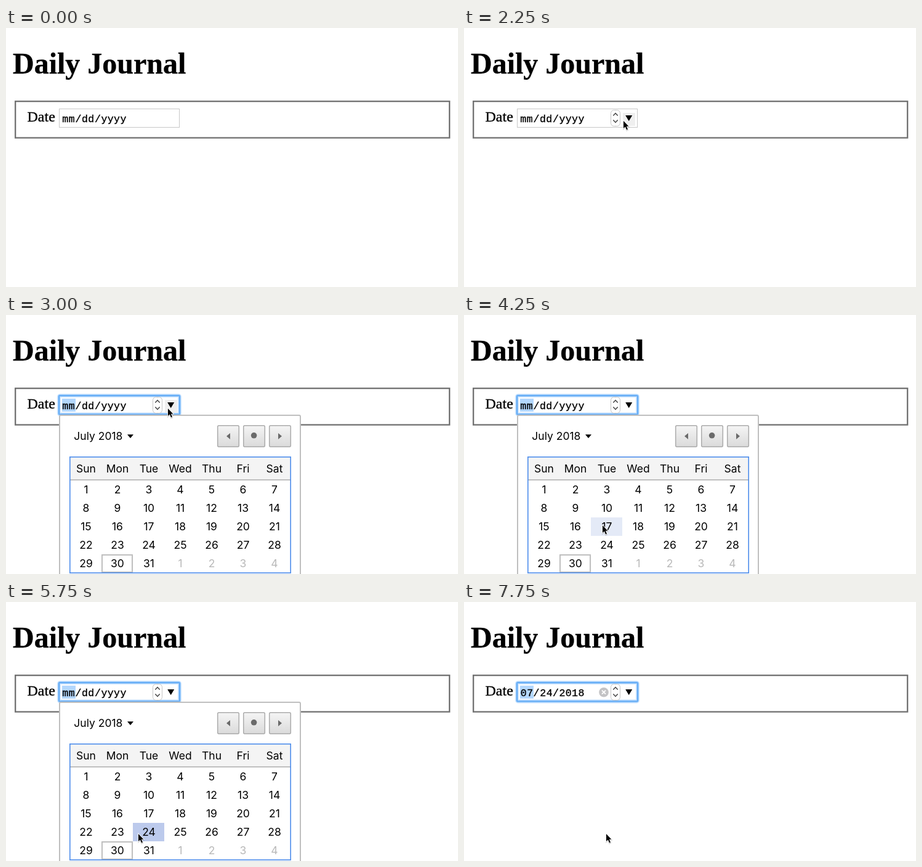
These frames come from a looping animation (734x421 px, 8000 ms). An HTML page:

```html
<!DOCTYPE html>
<html lang="en">
<head>
<meta charset="utf-8">
<title>Daily Journal</title>
<style>
html, body { margin: 0; width: 100%; height: 100%; overflow: hidden; background: #fff; }
svg { display: block; width: 734px; height: 421px; }
.serif { font-family: "Liberation Serif", "Times New Roman", serif; stroke: #000; stroke-width: .35px; }
.field { font: 16.6px "Liberation Mono", "Courier New", monospace; letter-spacing: .4px; stroke: #000; stroke-width: .35px; }
.cal text { font: 17.5px Inter, "Open Sans", sans-serif; }
.mid { text-anchor: middle; }

.step { animation: 8s step-end infinite; }
.hover { animation-name: hover; }
.button { animation-name: button; }
.focus { animation-name: focus; }
.open { animation-name: open; }
.empty { animation-name: empty; }
.filled { animation-name: filled; }
.d10 { animation-name: d10; }
.d17 { animation-name: d17; }
.d24 { animation-name: d24; }
.cursor { animation-name: cursor; }

@keyframes hover { 0% { opacity: 0 } 25%, 100% { opacity: 1 } }
@keyframes button { 0% { opacity: 0 } 25% { opacity: 1 } 46.875%, 100% { opacity: 0 } }
@keyframes focus { 0% { opacity: 0 } 34.375%, 100% { opacity: 1 } }
@keyframes open { 0% { opacity: 0 } 37.5% { opacity: 1 } 75%, 100% { opacity: 0 } }
@keyframes empty { 0% { opacity: 1 } 75%, 100% { opacity: 0 } }
@keyframes filled { 0% { opacity: 0 } 75%, 100% { opacity: 1 } }
@keyframes d10 { 0% { opacity: 0 } 50% { opacity: 1 } 53.125%, 100% { opacity: 0 } }
@keyframes d17 { 0% { opacity: 0 } 53.125% { opacity: 1 } 59.375%, 100% { opacity: 0 } }
@keyframes d24 {
  0% { opacity: 0; fill: #e4eaf7 }
  59.375% { opacity: 1; fill: #e4eaf7 }
  71.875%, 100% { opacity: 1; fill: #bccaec }
}
@keyframes cursor {
  0% { opacity: 0; transform: translate(490px, 31px) }
  9.375% { opacity: 1; transform: translate(490px, 31px) }
  12.5% { opacity: 1; transform: translate(306px, 107px) }
  15.625% { opacity: 1; transform: translate(235px, 133px) }
  25% { opacity: 1; transform: translate(251px, 146px) }
  28.125% { opacity: 1; transform: translate(257px, 150px) }
  31.25% { opacity: 1; transform: translate(261px, 151px) }
  43.75% { opacity: 1; transform: translate(260px, 154px) }
  46.875% { opacity: 1; transform: translate(256px, 251px) }
  50% { opacity: 1; transform: translate(226px, 337px) }
  53.125% { opacity: 1; transform: translate(223px, 341px) }
  56.25% { opacity: 1; transform: translate(212px, 358px) }
  59.375% { opacity: 1; transform: translate(207px, 371px) }
  62.5% { opacity: 1; transform: translate(205px, 376px) }
  65.625% { opacity: 1; transform: translate(213px, 376px) }
  93.75% { opacity: 1; transform: translate(212px, 375px) }
  96.875%, 100% { opacity: 1; transform: translate(229px, 376px) }
}
</style>
</head>
<body>
<svg viewBox="0 0 734 421" xmlns="http://www.w3.org/2000/svg">
  <defs>
    <linearGradient id="face" x2="0" y2="1">
      <stop offset="0" stop-color="#f5f5f5"/>
      <stop offset="1" stop-color="#dadada"/>
    </linearGradient>
  </defs>

  <text class="serif" x="11" y="74" font-size="48" font-weight="700">Daily Journal</text>
  <rect x="15.2" y="119.2" width="705" height="59.3" fill="none" stroke="#707070" stroke-width="2.3"/>
  <text class="serif" x="34.5" y="152" font-size="24">Date</text>

  <!-- date input -->
  <rect x="86.5" y="131.5" width="195" height="30" fill="#fff" stroke="#c8c8c8"/>
  <g class="step focus">
    <g fill="none" stroke="#5aa9f8">
      <rect x="86" y="131" width="196" height="30.5" rx="2" stroke-width="6.5" opacity=".22"/>
      <rect x="86" y="131" width="196" height="30.5" rx="2" stroke-width="4" opacity=".45"/>
      <rect x="86" y="131" width="196" height="30.5" rx="1" stroke-width="2" opacity=".75"/>
    </g>
    <rect x="91" y="136" width="22" height="21" fill="#b3d7fd"/>
  </g>
  <g class="field">
    <g class="step empty">
      <text x="91.3" y="152.5">mm</text><text x="123" y="152.5">dd</text><text x="154.4" y="152.5">yyyy</text>
    </g>
    <g class="step filled">
      <text x="91.8" y="152.5">07</text><text x="123.3" y="152.5">24</text><text x="154.4" y="152.5">2018</text>
    </g>
    <text x="112.6" y="152.5">/</text><text x="144" y="152.5">/</text>
  </g>
  <g class="step filled">
    <circle cx="227" cy="146.7" r="7.8" fill="#c3c3c5"/>
    <path d="M224 143.7l6 6m0-6l-6 6" stroke="#fff" stroke-width="1.8"/>
  </g>
  <rect class="step button" x="258" y="138" width="20" height="21" fill="#efefef"/>
  <g class="step hover">
    <rect x="238.5" y="133.5" width="15" height="26" rx="5" fill="#fff" stroke="#c4c4c4"/>
    <path d="M242.3 142.5l3.7-4 3.7 4M242.3 149.5l3.7 4 3.7-4" fill="none" stroke="#444" stroke-width="1.5"/>
    <path d="M262.2 142h11l-5.5 9.3z"/>
  </g>

  <!-- calendar popup -->
  <g class="cal step open">
    <rect x="87" y="163" width="391" height="290" rx="2" fill="#fff" stroke="#bfbfbf" stroke-width="2"/>
    <text x="110.3" y="203">July 2018</text>
    <path d="M197 194.3h10l-5 6z"/>
    <g fill="url(#face)" stroke="#ababab" stroke-width="1.5">
      <rect x="343.7" y="179.7" width="34.6" height="34.6" rx="2"/>
      <rect x="385.7" y="179.7" width="34.6" height="34.6" rx="2"/>
      <rect x="427.7" y="179.7" width="34.6" height="34.6" rx="2"/>
    </g>
    <path d="M364 192v10l-6-5zM442 192v10l6-5z" fill="#6a6a6a"/>
    <circle cx="402.6" cy="195.8" r="4.8" fill="#6a6a6a"/>
    <rect x="104" y="231" width="358" height="37" fill="#f4f4f4"/>
    <path d="M104 268h358" stroke="#bfbfbf" stroke-width="2"/>
    <g fill="#e4eaf7">
      <rect class="step d10" x="206" y="299" width="51" height="30"/>
      <rect class="step d17" x="206" y="329" width="51" height="30"/>
      <rect class="step d24" x="206" y="359" width="51" height="30"/>
    </g>
    <rect x="156" y="390" width="49" height="28" fill="none" stroke="#bfbfbf" stroke-width="2"/>
    <rect x="103.8" y="230.8" width="358.4" height="188.4" fill="none" stroke="#4d8deb" stroke-width="1.6"/>
    <g id="days" class="mid"></g>
  </g>

  <g class="step cursor">
    <path d="M2 2V14L4.9 11.4 7 16.6 9 15.7 6.9 10.7H10.4z" opacity=".22" stroke="#000" stroke-width="1.8"/>
    <path d="M2 1V13L4.9 10.4 7 15.6 9 14.7 6.9 9.7H10.4z" stroke="#fff" stroke-width="1.6" paint-order="stroke"/>
  </g>
</svg>
<script>
const days = document.getElementById('days');

function label(str, col, y, color) {
  const el = document.createElementNS('http://www.w3.org/2000/svg', 'text');
  el.setAttribute('x', 130 + 51 * col);
  el.setAttribute('y', y);
  el.setAttribute('fill', color);
  el.textContent = str;
  days.append(el);
}

['Sun', 'Mon', 'Tue', 'Wed', 'Thu', 'Fri', 'Sat'].forEach((d, i) => label(d, i, 256, '#000'));
for (let i = 0; i < 35; i++) {
  const next = i >= 31;
  label(next ? i - 30 : i + 1, i % 7, 290 + 30 * Math.floor(i / 7), next ? '#b8b8b8' : '#000');
}
</script>
</body>
</html>
```
